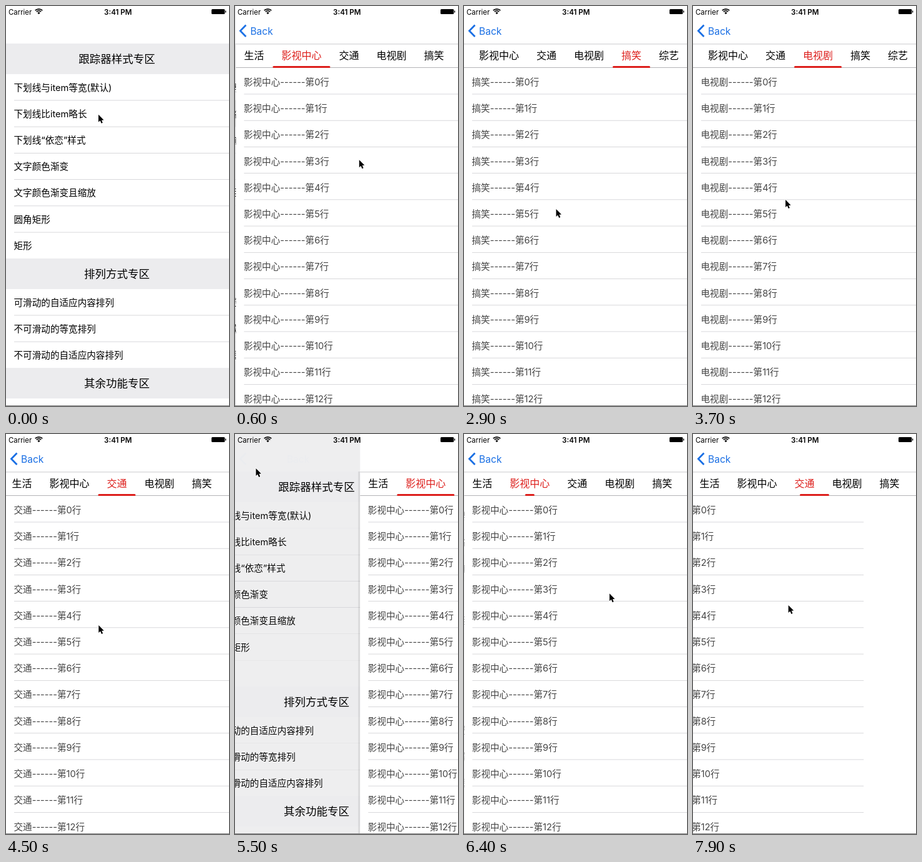
An HTML page with a canvas for the animation above (8000 ms loop, 357 by 640 pixels).

```html
<!DOCTYPE html>
<html lang="zh-CN">
<head>
<meta charset="utf-8">
<title>Page menu demo</title>
<style>
html, body { margin: 0; width: 100%; height: 100%; overflow: hidden; background: #fff; }
canvas { display: block; width: 357px; height: 640px; }
</style>
</head>
<body>
<canvas id="stage"></canvas>
<script>
const W = 357, H = 640, LOOP = 8000;
const ROW = 42.22, HEAD = 48.4, TOP = 60;
const NAV_TIME = 500, SWIPE_TIME = 500, MAX_SCROLL = 49;
const canvas = document.getElementById('stage');
const g = canvas.getContext('2d');
const dpr = window.devicePixelRatio || 1;
canvas.width = W * dpr;
canvas.height = H * dpr;

const FAMILY = 'Inter, "Noto Sans CJK SC", "Noto Sans CJK", "Noto Sans SC", sans-serif';
const RED = '#dd1f1c', BLUE = '#1a6fe4', LINE = '#c8c8cc';

const clamp = (v, a = 0, b = 1) => Math.max(a, Math.min(b, v));
const mix = (a, b, u) => a + (b - a) * u;
const smooth = u => (1 - Math.cos(Math.PI * clamp(u))) / 2;
const easeOut = u => 1 - Math.pow(1 - clamp(u), 3);

const menu = [
  { title: '跟踪器样式专区', rows: ['下划线与item等宽(默认)', '下划线比item略长', '下划线“依恋”样式',
    '文字颜色渐变', '文字颜色渐变且缩放', '圆角矩形', '矩形'] },
  { title: '排列方式专区', rows: ['可滑动的自适应内容排列', '不可滑动的等宽排列', '不可滑动的自适应内容排列'] },
  { title: '其余功能专区', rows: [] }
];

// Tab layout: 16px per character, 28px between labels
let tabX = 13;
const tabs = ['生活', '影视中心', '交通', '电视剧', '搞笑', '综艺'].map(name => {
  const w = name.length * 16, tab = { name, x: tabX, mid: tabX + w / 2, w };
  tabX += w + 28;
  return tab;
});

// Each visit starts on tab 1; a swipe has a start time, a page step and a pointer height
const swipe = (start, step, y) => ({ start, step, y });
const visits = [
  { push: 180, pop: 5381, row: 1, sticky: false, swipes: [
    swipe(850, 1, 300), swipe(1760, 1, 306), swipe(2350, 1, 325),
    swipe(3000, -1, 325), swipe(3730, -1, 310), swipe(4540, -1, 306)] },
  { push: 5950, pop: Infinity, row: 2, sticky: true, swipes: [
    swipe(6450, 1, 257), swipe(7740, 1, 274)] }
];

// Pointer gestures follow from the visits: tap a row, drag the pages, tap Back
const DRAG = 0.25;
const tap = (t, x, y) => ({ start: t - 60, end: t + 120, x, y, step: 0 });
const gestures = visits.flatMap(v => [
  tap(v.push, 147.5, TOP + HEAD + (v.row + 0.55) * ROW),
  ...v.swipes.map(s => ({ ...s, end: s.start + SWIPE_TIME / 3, x: s.step > 0 ? 236 : 147 })),
  tap(v.pop, 33, 55)
]).filter(e => e.start < LOOP);

function pointerIn(e, t) {
  const u = smooth((t - e.start) / SWIPE_TIME);
  return [e.x - e.step * W * Math.min(u, DRAG), e.y];
}

function pointerAt(t) {
  const i = gestures.findLastIndex(e => e.start <= t);
  if (i < 0) return pointerIn(gestures[0], t);
  const now = gestures[i], next = gestures[i + 1];
  const [x, y] = pointerIn(now, t);
  if (!next || t < now.end) return [x, y];
  const u = smooth((t - now.end) / (next.start - now.end));
  return [mix(x, next.x, u), mix(y, next.y, u)];
}

function rect(x, y, w, h, color) {
  g.fillStyle = color;
  g.fillRect(x, y, w, h);
}

function pill(x, y, w, h, r, color) {
  g.fillStyle = color;
  g.beginPath();
  g.roundRect(x, y, w, h, r);
  g.fill();
}

// Text centred vertically on cy
function label(str, x, cy, size, color = '#000', weight = 400, align = 'left') {
  g.font = `${weight} ${size}px ${FAMILY}`;
  g.fillStyle = color;
  g.textAlign = align;
  g.fillText(str, x, cy + size * 0.37);
}

function drawMenu(active) {
  rect(0, 0, W, H, '#fff');
  let y = TOP;
  menu.forEach((section, s) => {
    rect(0, y, W, HEAD + 0.6, '#ececee');
    label(section.title, W / 2 - 1, y + 25, 17.5, '#000', 500, 'center');
    y += HEAD;
    section.rows.forEach((row, i) => {
      if (s === 0 && i === active) rect(0, y, W, ROW, '#d9d9d9');
      label(row, 12.5, y + 21.8, 14.6);
      y += ROW;
      if (i < section.rows.length - 1) rect(13, y, W - 13, 0.7, LINE);
    });
  });
}

function drawList(name, left) {
  for (let i = 0; i < 13; i++) {
    const top = 99 + i * ROW;
    label(`${name}------第${i}行`, left + 12.5, top + 22.5, 14.6, '#444');
    rect(left + 13, top + ROW - 0.6, W - 13, 0.7, LINE);
  }
}

const scrollFor = i => clamp(tabs[i].mid - W / 2, 0, MAX_SCROLL);

function stateAt(visit, t) {
  const st = { from: 1, to: 1, u: 0, sel: 1, scroll: scrollFor(1), loaded: new Set([1]) };
  for (const s of visit.swipes) {
    if (t < s.start) break;
    const end = s.start + SWIPE_TIME;
    st.from = st.to;
    st.to = st.from + s.step;
    st.u = smooth((t - s.start) / SWIPE_TIME);
    if (t < end) break;
    st.sel = st.to;
    st.loaded.add(st.to);
    st.scroll = mix(scrollFor(st.from), scrollFor(st.to), smooth((t - end) / 300));
  }
  return st;
}

function trackerSpan(st, sticky) {
  const a = tabs[st.from], b = tabs[st.to];
  if (!sticky) {
    const half = mix(a.w, b.w, st.u) / 2 + 14, mid = mix(a.mid, b.mid, st.u);
    return [mid - half, mid + half];
  }
  const lead = mix(a.mid, b.mid, clamp(st.u * 2));
  const tail = mix(a.mid, b.mid, clamp(st.u * 2 - 1));
  return [Math.min(lead, tail) - 7.5, Math.max(lead, tail) + 7.5];
}

function drawPage(visit, t) {
  const st = stateAt(visit, t), pos = mix(st.from, st.to, st.u);
  rect(0, 0, W, H, '#fff');
  tabs.forEach((tab, i) => {
    const left = (i - pos) * W;
    if (Math.abs(left) < W && st.loaded.has(i)) drawList(tab.name, left);
  });
  rect(0, 60.5, W, 0.8, '#bdbdc0');
  rect(0, 98, W, 1, '#b4b4b6');
  tabs.forEach((tab, i) =>
    label(tab.name, tab.x - st.scroll, 79.5, 16, i === st.sel ? RED : '#000'));
  const [x0, x1] = trackerSpan(st, visit.sticky);
  pill(x0 - st.scroll, 96, x1 - x0, 3, 1.5, RED);
}

function drawBack(q) {
  g.save();
  g.globalAlpha = Math.pow(q, 5);
  g.strokeStyle = BLUE;
  g.lineWidth = 2.8;
  g.beginPath();
  g.moveTo(17.5, 30.5);
  g.lineTo(8.5, 39.8);
  g.lineTo(17.5, 49);
  g.stroke();
  label('Back', 24 + 105 * (1 - q), 40, 15.6, BLUE);
  g.restore();
}

function drawStatus() {
  label('Carrier', 4, 9.3, 11.4);
  label('3:41 PM', 179.3, 9.3, 11.6, '#000', 600, 'center');
  const fan = r => {
    g.beginPath();
    g.arc(52.5, 13, r, -Math.PI * 0.75, -Math.PI * 0.25);
  };
  g.strokeStyle = '#000';
  g.lineWidth = 1.7;
  for (const r of [8.2, 5.3]) {
    fan(r);
    g.stroke();
  }
  fan(3);
  g.lineTo(52.5, 13.2);
  g.fillStyle = '#000';
  g.fill();
  pill(329, 5, 21.3, 8, 1.5, '#000');
  rect(351, 7.5, 1.3, 3, '#000');
}

function drawCursor(t) {
  g.save();
  g.translate(...pointerAt(t));
  const arrow = new Path2D('M.5 0V12L3.2 9.5L5.2 14L7.3 13L5.4 8.8L9 8.6Z');
  g.lineJoin = 'round';
  g.lineWidth = 1.8;
  g.strokeStyle = '#fff';
  g.stroke(arrow);
  g.fillStyle = '#000';
  g.fill(arrow);
  g.restore();
}

// The menu slides aside and greys as the page covers it by q
function drawCovered(q, active) {
  g.save();
  g.translate(-0.3 * W * q, 0);
  drawMenu(active);
  g.restore();
  if (q === 0) return;
  const edge = W * (1 - q), grey = 255 - 19 * Math.min(1, q * 2);
  g.globalCompositeOperation = 'darken';
  rect(0, 0, W, H, `rgb(${grey},${grey},${grey + 1})`);
  g.globalCompositeOperation = 'source-over';
  rect(edge - 3, TOP, 3, H - TOP, 'rgba(0,0,0,0.09)');
}

function draw(t) {
  g.setTransform(dpr, 0, 0, dpr, 0, 0);
  const visit = visits.find(v => t < v.pop + NAV_TIME);
  const q = easeOut((t - visit.push) / NAV_TIME) - easeOut((t - visit.pop) / NAV_TIME);
  const pressed = t > visit.push - 60 && t < visit.pop;

  if (q < 1) drawCovered(q, pressed ? visit.row : -1);
  if (q > 0) {
    g.save();
    g.translate(W * (1 - q), 0);
    drawPage(visit, t);
    g.restore();
    drawBack(q);
  }
  drawStatus();
  rect(0, 639, W, 1, '#808080');
  drawCursor(t);
}

const begin = performance.now();
function tick() {
  draw((performance.now() - begin) % LOOP);
  requestAnimationFrame(tick);
}
tick();
</script>
</body>
</html>
```
